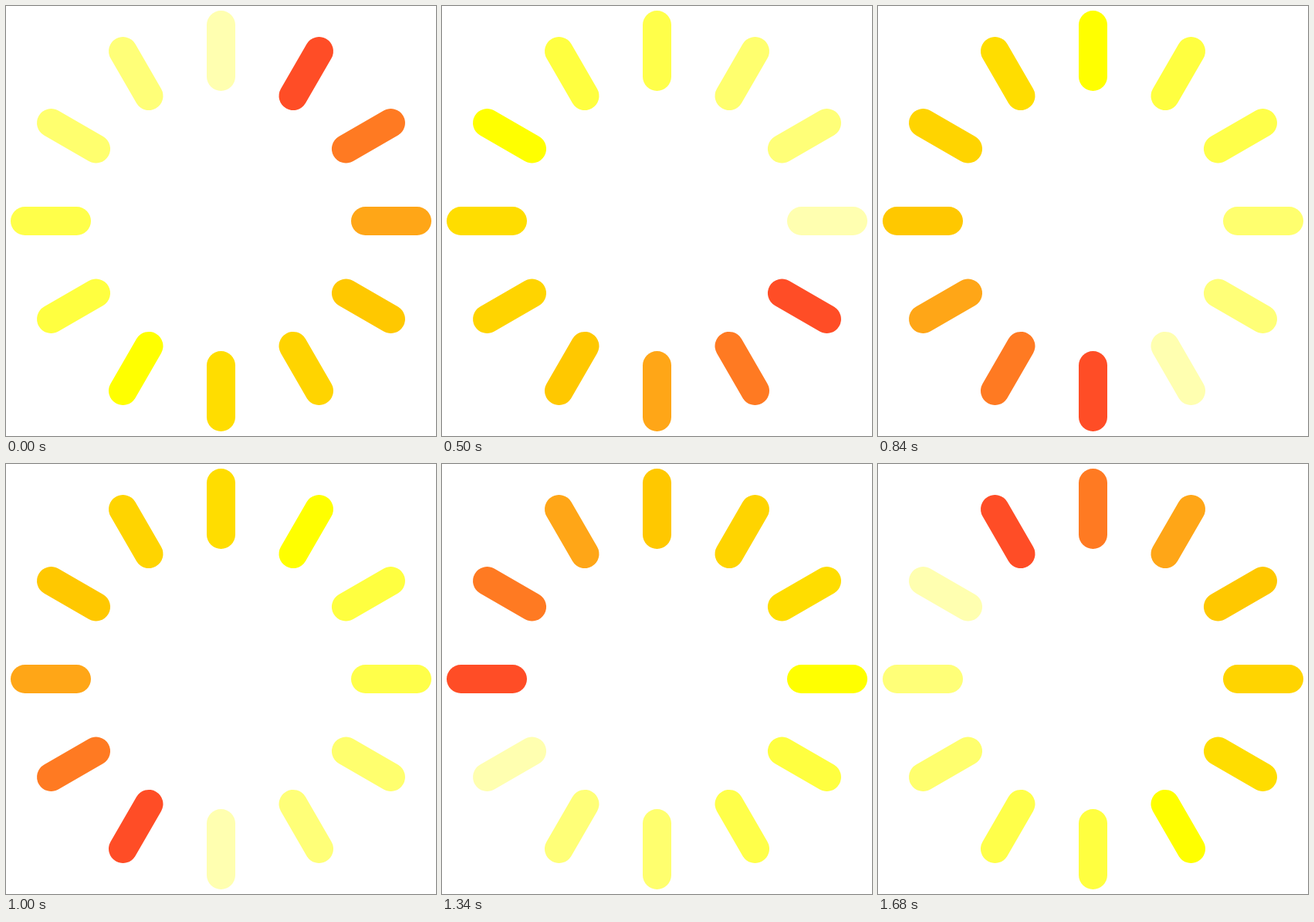
These frames come from a looping animation (557 px wide and 557 px high, 1.82 s). An HTML page:

```html
<!DOCTYPE html>
<html lang="en">
<head>
<meta charset="utf-8">
<title>Spinner</title>
<style>
  html, body { margin: 0; width: 100%; height: 100%; overflow: hidden; background: #fff; }
  svg { display: block; width: 100%; height: 100%; }
  line { stroke-width: 37; stroke-linecap: round; }
</style>
</head>
<body>
<svg id="stage" viewBox="0 0 557 557"></svg>
<script>
  const LOOP = 1820;
  const STARTS = [0, 180, 340, 500, 680, 840, 1000, 1180, 1340, 1500, 1680];
  // Clockwise from the leading bar
  const COLORS = [
    '#ff4d26', '#ff7a22', '#ffa617', '#ffc800', '#ffd400', '#ffdd00',
    '#ffff00', '#ffff40', '#ffff4a', '#ffff6e', '#ffff78', '#ffffb0'
  ];
  const COUNT = COLORS.length;
  const CENTER = 278.5, INNER = 187, OUTER = 254;

  const stage = document.getElementById('stage');
  const bars = COLORS.map((_, i) => {
    const bar = document.createElementNS('http://www.w3.org/2000/svg', 'line');
    const attrs = {
      x1: CENTER, x2: CENTER, y1: CENTER - INNER, y2: CENTER - OUTER,
      transform: `rotate(${i * 360 / COUNT} ${CENTER} ${CENTER})`
    };
    for (const key in attrs) bar.setAttribute(key, attrs[key]);
    return stage.appendChild(bar);
  });

  let shown = -1;

  function draw(time) {
    const t = time % LOOP;
    const step = STARTS.filter(start => start <= t).length;
    if (step === shown) return;
    shown = step;
    // The lead starts one bar past the top and skips the top on wrapping
    bars.forEach((bar, i) => bar.setAttribute('stroke', COLORS[(i - step + COUNT) % COUNT]));
  }

  const origin = performance.now();
  function tick() {
    draw(performance.now() - origin);
    requestAnimationFrame(tick);
  }
  tick();
</script>
</body>
</html>
```
